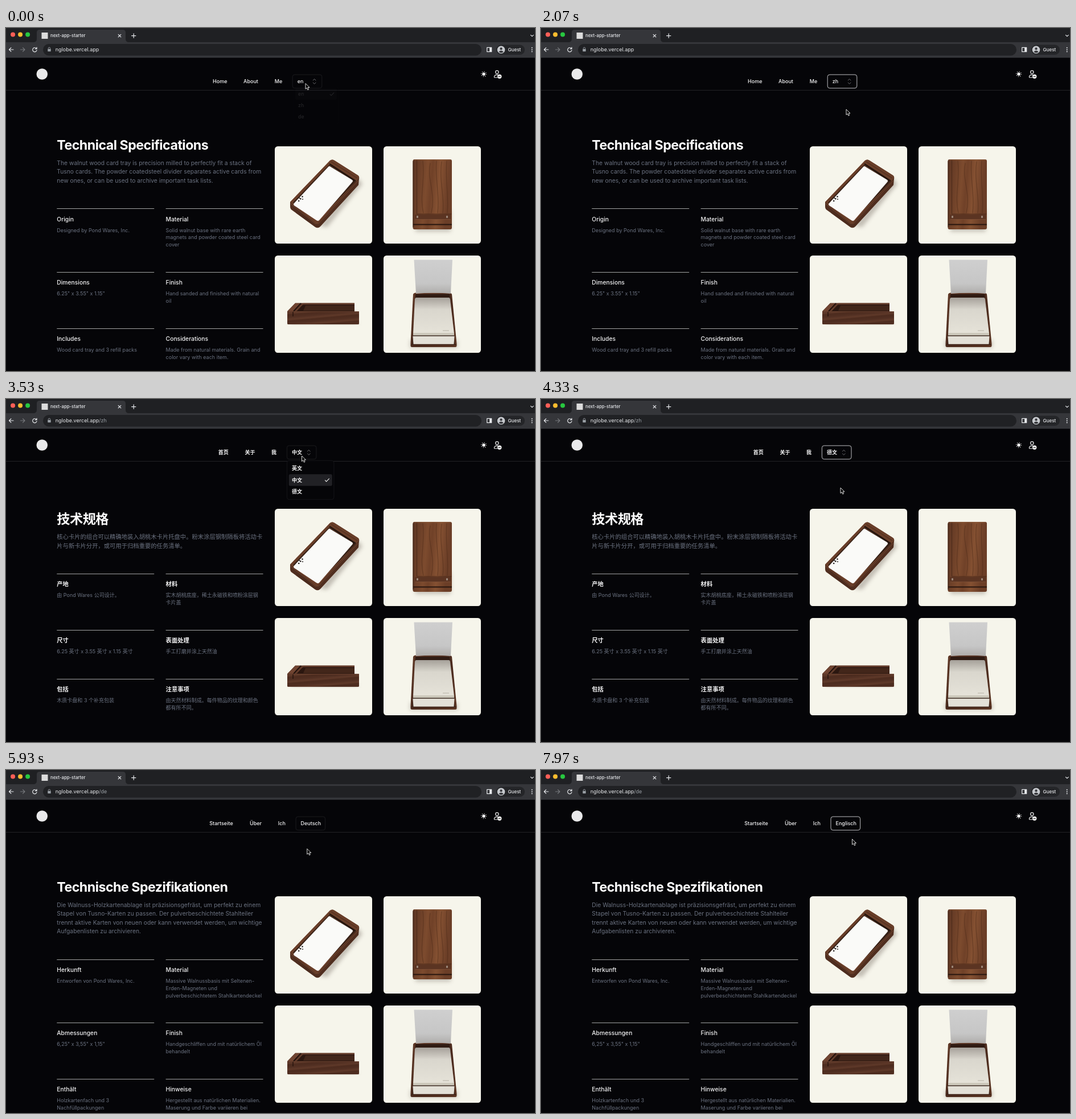
Animation, 929 px wide and 603 px high, one loop 8 s. Source, as an HTML page:

```html
<!DOCTYPE html>
<html lang="en">
<head>
<meta charset="utf-8">
<title>next-app-starter</title>
<style>
  html, body { margin: 0; width: 100%; height: 100%; overflow: hidden; background: #050508; }
  svg { display: block; width: 100vw; height: 100vh; }
  text { font-family: Inter, "Noto Sans CJK SC", "Noto Sans CJK", sans-serif; white-space: pre; }
  .line { fill: none; stroke-linecap: round; stroke-linejoin: round; }
</style>
</head>
<body>
<svg id="stage" viewBox="0 0 929 603" xmlns="http://www.w3.org/2000/svg">
  <defs>
    <linearGradient id="grain" gradientUnits="userSpaceOnUse" x1="52" y1="0" x2="120" y2="6">
      <stop offset="0" stop-color="#5a3322"/><stop offset=".2" stop-color="#6a3e27"/>
      <stop offset=".42" stop-color="#7d4b2e"/><stop offset=".55" stop-color="#704128"/>
      <stop offset=".75" stop-color="#855132"/><stop offset="1" stop-color="#6b3e27"/>
    </linearGradient>
    <linearGradient id="side" gradientUnits="userSpaceOnUse" x1="0" y1="0" x2="1" y2="11" spreadMethod="repeat">
      <stop offset="0" stop-color="#512f22"/><stop offset=".35" stop-color="#5f3929"/>
      <stop offset=".6" stop-color="#4c2b1e"/><stop offset="1" stop-color="#512f22"/>
    </linearGradient>
    <linearGradient id="rim" x1="0" y1="0" x2="1" y2="1">
      <stop offset="0" stop-color="#5f3826"/><stop offset=".55" stop-color="#4a2a1d"/><stop offset="1" stop-color="#5c3624"/>
    </linearGradient>
    <linearGradient id="paper" x1="0" y1="0" x2="0" y2="1">
      <stop offset="0" stop-color="#cfcfcf"/><stop offset=".7" stop-color="#c6c6c6"/><stop offset="1" stop-color="#aeacaa"/>
    </linearGradient>
    <linearGradient id="stack" x1="0" y1="0" x2="0" y2="1">
      <stop offset="0" stop-color="#a5a099"/><stop offset=".32" stop-color="#d9d6cd"/><stop offset="1" stop-color="#e6e3d9"/>
    </linearGradient>
    <filter id="soft" x="-30%" y="-30%" width="160%" height="160%"><feGaussianBlur stdDeviation="3.500"/></filter>
    <clipPath id="round"><rect width="171" height="171" rx="5.200"/></clipPath>

    <g id="photo0">
      <path d="M78 140L146 56L154 66L92 142Z" fill="#8d857b" opacity=".5" filter="url(#soft)"/>
      <path d="M97 25Q101 22 105 25L146 51Q149 53 148 57L147 68L80 141Q76 145 71 142L30 112Q27 110 27 106L27 98Z" fill="url(#rim)"/>
      <path d="M27 98L97 25Q101 22 105 25L146 51Q149 53 147 57L77 134Q74 137 70 134Z" fill="#693e29"/>
      <path d="M32 99L95 33L142 62L75 131Z" fill="#352016"/>
      <path d="M96 31L142 61" stroke="#21130d" stroke-width="2.400"/>
      <path d="M99 27L145 56" stroke="#4a2a1b" stroke-width="1"/>
      <path d="M94 36Q96 34 98 36L136 59Q138 61 136 63L78 130Q76 132 73 130L34 104Q32 102 34 100Z" fill="#fafaf8"/>
      <path d="M28 101L71 136L77 136L147 60" class="line" stroke="#764a33" stroke-width=".9"/>
      <g fill="#24201f"><circle cx="48.500" cy="88.500" r="1.300"/><circle cx="45.300" cy="92.300" r="1.300"/><circle cx="42.200" cy="96" r="1.300"/>
      <circle cx="49" cy="93" r="1"/><circle cx="43.300" cy="91" r="1"/></g>
    </g>
    <g id="photo1">
      <rect x="56" y="112" width="62" height="38" fill="#8d857b" opacity=".45" filter="url(#soft)"/>
      <rect x="51.500" y="23" width="68.500" height="123" rx="3" fill="url(#grain)"/>
      <path d="M52.500 26V142" stroke="#4d2c1c" stroke-width="2"/>
      <path d="M58.500 24V119H119" class="line" stroke="#4a2919" stroke-width="1"/>
      <path d="M54 24H118" stroke="#8d5d3e" stroke-width=".8"/>
      <path d="M82 30C76 60 92 80 84 117M102 27C97 60 108 92 104 117M69 26C73 60 63 88 70 117M93 26C90 55 99 84 95 117M111 26C108 60 115 90 112 117" class="line" stroke="#4a2818" stroke-width="1.300" opacity=".45"/>
      <rect x="55" y="120" width="63" height="8" fill="#5b3422"/>
      <path d="M56 128.500H118" stroke="#7d5036" stroke-width=".8"/>
      <path d="M52 137.500H120" stroke="#28160f" stroke-width="1.800"/>
      <g fill="#9b8779"><rect x="58" y="122" width="3" height="4" rx="1"/><rect x="110" y="122" width="3" height="4" rx="1"/></g>
    </g>
    <g id="photo2">
      <rect x="28" y="116" width="118" height="5" fill="#8d857b" opacity=".4" filter="url(#soft)"/>
      <path d="M22 98L36 83.500H140V99H148V119Q148 121 146 121H24Q22 121 22 119Z" fill="#5a3526"/>
      <path d="M47 86.500H140V98H37Z" fill="#2b1710"/>
      <path d="M54 88H140V97H50Z" fill="#42261a"/>
      <path d="M23 97.500L36.500 84H44L32 97.500Z" fill="#704431"/>
      <path d="M33 98L46 84" stroke="#1b0e0a" stroke-width="1.800"/>
      <path d="M38 97L50 84.500H139" class="line" stroke="#6b422f" stroke-width="1.500"/>
      <path d="M22 98.500H148V119Q148 121 146 121H24Q22 121 22 119Z" fill="url(#side)"/>
      <path d="M23 98.700H148" stroke="#6f4633" stroke-width=".9"/>
      <path d="M32 99V107" stroke="#21110c" stroke-width="1.300"/>
    </g>
    <g id="photo3">
      <path d="M47 148H130V162H46Z" fill="#8d857b" opacity=".4" filter="url(#soft)"/>
      <path d="M52 68Q53 65.500 56 65.500H116Q119 65.500 120 68L128.500 155V159Q128.500 161 126 161H50Q47.500 161 47.500 159V155Z" fill="url(#rim)"/>
      <path d="M56 68H116L125 156H51Z" fill="#2f1b13"/>
      <path d="M53.500 7.500H121L118 67Q86 64 57 67Z" fill="url(#paper)"/>
      <path d="M57.500 74H114.500Q116.500 74 117 77L124 137Q124 139 122 139H54Q52 139 52 137L55 77Q55.500 74 57.500 74Z" fill="url(#stack)"/>
      <path d="M52 136H124V140.500H52Z" fill="#cbc7ba"/>
      <path d="M51.500 142H124.500L123.500 156H52.500Z" fill="#e3e0d7"/>
      <path d="M52 141.300H124.500" stroke="#55463c" stroke-width="1.200"/>
      <path d="M48 156.500H128" stroke="#3c2117" stroke-width="1.500"/>
      <path d="M104 132H115" stroke="#a9a499" stroke-width=".8"/>
    </g>
  </defs>

  <rect width="929" height="603" fill="#050508"/>
  <g id="pages"></g>
  <rect y="109.200" width="929" height=".8" fill="#28282c"/>

  <rect width="929" height="26" fill="#1f2023"/>
  <path d="M48 25Q54 25 54 19V8Q54 3 59 3H205Q210 3 210 8V19Q210 25 216 25Z" fill="#35363a"/>
  <rect y="25" width="929" height="27.300" fill="#35363a"/>
  <rect x="65" y="28" width="770" height="20.500" rx="10.200" fill="#202124"/>
  <circle cx="12.100" cy="11.500" r="4" fill="#ff5f57"/>
  <circle cx="25.100" cy="11.500" r="4" fill="#febc2e"/>
  <circle cx="38.100" cy="11.500" r="4" fill="#28c840"/>
  <rect x="62.500" y="8" width="11" height="11" fill="#dcdcdc"/>
  <g class="line" stroke="#e8eaed" stroke-width="1.200">
    <path d="M197.200 11.300l4.600 4.600m0-4.600l-4.600 4.600M220.500 13.600h7.400m-3.700-3.700v7.400M921.500 12.300l2.400 2.400 2.400-2.400"/>
    <path d="M13 38H5.500m3.400-3.400L5.500 38l3.400 3.400"/>
    <path d="M25.500 38H33m-3.400-3.400L33 38l-3.400 3.400" stroke="#77797d"/>
    <path d="M53.400 36A3.700 3.700 0 1 0 54 39.200M54 34v2.700h-2.700"/>
    <path d="M74.300 37v-1.300a1.700 1.700 0 0 1 3.400 0V37" stroke="#9aa0a6" stroke-width=".9"/>
    <rect x="844.700" y="34.300" width="8" height="7.400"/>
  </g>
  <rect x="73.300" y="37" width="5.400" height="4.300" rx=".6" fill="#9aa0a6"/>
  <rect x="849.200" y="34.300" width="3.500" height="7.400" fill="#e8eaed"/>
  <rect x="861" y="29.500" width="50" height="17.500" rx="8.700" fill="#242528"/>
  <circle cx="869.500" cy="38.200" r="6.800" fill="#c6c9cd"/>
  <circle cx="869.500" cy="36.400" r="2.100" fill="#35363a"/>
  <path d="M865.300 42q4.200-4.400 8.400 0q-4.200 3.600-8.400 0Z" fill="#35363a"/>
  <g fill="#e8eaed"><circle cx="923.700" cy="34.800" r="1"/><circle cx="923.700" cy="38.200" r="1"/><circle cx="923.700" cy="41.600" r="1"/></g>
  <g id="labels"></g>

  <circle cx="63.300" cy="81" r="9.800" fill="#e9e9ea"/>
  <circle cx="839" cy="81" r="2.700" fill="#fff"/>
  <circle cx="839" cy="81" r="4.400" fill="none" stroke="#fff" stroke-width="1.300" stroke-dasharray="1 2.455"/>
  <g class="line" stroke="#eee" stroke-width="1.200">
    <circle cx="862.300" cy="77.600" r="2.700"/>
    <path d="M863 87H857.500Q856.700 82.400 862 82.400H864"/>
  </g>
  <circle cx="866.700" cy="85.300" r="3.700" fill="#eee"/>
  <path d="M864.700 85.300h4" stroke="#111" stroke-width="1"/>

  <g id="trigger"></g>
  <g id="menu"></g>
  <path id="cursor" d="M0 0V9.700L2.200 7.700L3.800 11.200L5.500 10.500L4 7H7Z" fill="#000" stroke="#fff" stroke-width=".85" stroke-linejoin="round"/>
</svg>

<script>
const LOOP = 8000;
const COL = [89.3, 280.6], PHOTO_X = [472, 663], CELL = 171, GAP = 20.6;
const SMALL = 9.03, BODY = 10.32, HEAD = 23.22;
const ITEM_H = 20.64, MENU_Y = 108.3, FIRST_ITEM = 121.6;

const pages = [
  {
    path: '', head: 206, intro: 237, rows: 317.3, photos: 208, trigger: 503.2, chevrons: true, medium: 500,
    nav: [[363, 'Home'], [417, 'About'], [471.7, 'Me']],
    langs: ['en', 'zh', 'de'],
    title: 'Technical Specifications',
    text: ['The walnut wood card tray is precision milled to perfectly fit a stack of',
      'Tusno cards. The powder coatedsteel divider separates active cards from',
      'new ones, or can be used to archive important task lists.'],
    specs: [['Origin', 'Designed by Pond Wares, Inc.'],
      ['Material', 'Solid walnut base with rare earth', 'magnets and powder coated steel card', 'cover'],
      ['Dimensions', '6.25" x 3.55" x 1.15"'],
      ['Finish', 'Hand sanded and finished with natural', 'oil'],
      ['Includes', 'Wood card tray and 3 refill packs'],
      ['Considerations', 'Made from natural materials. Grain and', 'color vary with each item.']]
  },
  {
    path: '/zh', head: 210.5, intro: 242.3, rows: 307.2, photos: 193, trigger: 493.4, chevrons: true, medium: 700,
    nav: [[372.8, '首页'], [419.4, '关于'], [466, '我']],
    langs: ['英文', '中文', '德文'],
    title: '技术规格',
    text: ['核心卡片的组合可以精确地装入胡桃木卡片托盘中。粉末涂层钢制隔板将活动卡',
      '片与新卡片分开，或可用于归档重要的任务清单。'],
    specs: [['产地', '由 Pond Wares 公司设计。'],
      ['材料', '实木胡桃底座，稀土永磁铁和喷粉涂层钢', '卡片盖'],
      ['尺寸', '6.25 英寸 x 3.55 英寸 x 1.15 英寸'],
      ['表面处理', '手工打磨并涂上天然油'],
      ['包括', '木质卡盘和 3 个补充包装'],
      ['注意事项', '由天然材料制成。每件物品的纹理和颜色', '都有所不同。']]
  },
  {
    path: '/de', head: 206, intro: 237, rows: 332.5, photos: 222.4, trigger: 509, chevrons: false, medium: 500,
    nav: [[357.3, 'Startseite'], [428, 'Über'], [477.8, 'Ich']],
    langs: ['Englisch', 'Chinesisch', 'Deutsch'],
    title: 'Technische Spezifikationen',
    text: ['Die Walnuss-Holzkartenablage ist präzisionsgefräst, um perfekt zu einem',
      'Stapel von Tusno-Karten zu passen. Der pulverbeschichtete Stahlteiler',
      'trennt aktive Karten von neuen oder kann verwendet werden, um wichtige',
      'Aufgabenlisten zu archivieren.'],
    specs: [['Herkunft', 'Entworfen von Pond Wares, Inc.'],
      ['Material', 'Massive Walnussbasis mit Seltenen-', 'Erden-Magneten und', 'pulverbeschichtetem Stahlkartendeckel'],
      ['Abmessungen', '6,25" x 3,55" x 1,15"'],
      ['Finish', 'Handgeschliffen und mit natürlichem Öl', 'behandelt'],
      ['Enthält', 'Holzkartenfach und 3', 'Nachfüllpackungen'],
      ['Hinweise', 'Hergestellt aus natürlichen Materialien.', 'Maserung und Farbe variieren bei', 'jedem Stück.']]
  }
];

// Each visit: page from start; menu open and close; choice picked at close.
const visits = [
  { start: 0, open: -18, close: 880, from: 0, to: 1 },
  { start: 2600, open: 3290, close: 4120, from: 1, to: 2 },
  { start: 4760, open: 6480, close: 7440, from: 2, to: 0 }
];

// time, x, y of the pointer tip
const pointer = [
  [0, 526, 97.5], [220, 527, 99], [740, 536, 141], [1170, 537, 148], [2070, 536, 143],
  [2650, 534, 140], [3150, 519, 97], [3530, 519.5, 100], [3960, 525, 158], [4350, 526, 156],
  [4970, 526.5, 143], [5850, 528, 141], [6400, 541, 98], [6830, 543, 105], [7300, 546, 121.5], [8000, 546.5, 121.5]
];

const $ = id => document.getElementById(id);
const clamp = v => Math.min(1, Math.max(0, v));
const ease = p => p * p * (3 - 2 * p);

// y is the middle of the line box
function label(x, y, str, size = SMALL, weight = 400, fill = '#f4f4f5', spacing = 0) {
  return `<text x="${x}" y="${y + size * .364}" font-size="${size}" font-weight="${weight}" fill="${fill}" letter-spacing="${spacing}">${str}</text>`;
}

function pageMarkup(page) {
  let out = page.nav.map(([x, s]) => label(x, 93.7, s, SMALL, page.medium)).join('');
  out += label(COL[0], page.head, page.title, HEAD, 700, '#fff', -HEAD * .023);
  page.text.forEach((s, i) => out += label(COL[0], page.intro + i * 15.48, s, BODY, 400, '#6b7280'));
  let y = page.rows;
  for (let i = 0; i < 6; i += 2) {
    const pair = page.specs.slice(i, i + 2);
    pair.forEach(([name, ...lines], c) => {
      out += `<rect x="${COL[c]}" y="${Math.round(y)}" width="170.900" height="1" fill="#a3a4a3"/>`;
      out += label(COL[c], y + 18.5, name, BODY, page.medium);
      lines.forEach((s, n) => out += label(COL[c], y + 38 + n * 12.9, s, SMALL, 400, '#6b7280'));
    });
    y += 72.9 + 12.9 * (Math.max(...pair.map(p => p.length)) - 1);
  }
  for (let i = 0; i < 4; i++) {
    const py = Math.round(page.photos + (i >> 1) * (CELL + GAP));
    out += `<g transform="translate(${PHOTO_X[i % 2]} ${py})" clip-path="url(#round)"><rect width="171" height="171" fill="#f6f5eb"/><use href="#photo${i}"/></g>`;
  }
  return `<g>${out}</g>`;
}

function triggerMarkup(page, value, ring) {
  const x = page.trigger;
  return `<rect x="${x}" y="82" width="51.600" height="23.800" rx="3.800" fill="none" stroke="${ring ? '#d4d4d8' : '#1d1d21'}" stroke-width=".9"/>`
    + label(x + 8.5, 93.7, page.langs[value], SMALL, page.medium)
    + (page.chevrons ? `<path class="line" d="M${x + 36} 92l2.400-2.300 2.400 2.300m-4.800 4l2.400 2.300 2.400-2.300" stroke="#88888c" stroke-width=".8"/>` : '');
}

function menuMarkup(page, chosen, active) {
  const x = page.trigger;
  const mid = i => FIRST_ITEM + i * ITEM_H;
  return `<rect x="${x}" y="${MENU_Y}" width="82.500" height="68.400" rx="3.900" fill="#050508" stroke="#1a1a1e" stroke-width=".8"/>`
    + `<rect x="${x + 3.3}" y="${mid(active) - ITEM_H / 2 + .3}" width="76" height="${ITEM_H}" rx="2.500" fill="#212125"/>`
    + page.langs.map((s, i) => label(x + 8.5, mid(i), s, SMALL, page.medium)).join('')
    + `<path class="line" d="M${x + 67} ${mid(chosen) + .6}l2.200 2.300 4.800-5" stroke="#eee" stroke-width="1.100"/>`;
}

function pointerAt(t) {
  const i = Math.max(1, pointer.findIndex(k => k[0] > t));
  const [a, b] = [pointer[i - 1], pointer[i]];
  const p = ease(clamp((t - a[0]) / (b[0] - a[0])));
  return [1, 2].map(n => a[n] + (b[n] - a[n]) * p);
}

$('pages').innerHTML = pages.map(pageMarkup).join('');
$('labels').innerHTML = label(78, 13.5, 'next-app-starter', 7.74, 500, '#e8eaed')
  + label(881.5, 38.2, 'Guest', 8.1, 500, '#e8eaed')
  + label(86.8, 38.2, 'nglobe.vercel.app<tspan id="path" fill="#9aa0a6"></tspan>', SMALL, 400, '#e8eaed');

function render(t) {
  const index = visits.findLastIndex(v => t >= v.start);
  const visit = visits[index], page = pages[index];
  [...$('pages').children].forEach((g, i) => g.style.display = i === index ? '' : 'none');
  $('path').textContent = page.path;

  const picked = t >= visit.close;
  $('trigger').innerHTML = triggerMarkup(page, picked ? visit.to : visit.from, picked);

  const [x, y] = pointerAt(t);
  $('cursor').setAttribute('transform', `translate(${x} ${y})`);

  const shown = picked ? 1 - clamp((t - visit.close) / 150) : clamp((t - visit.open) / 150);
  const menu = $('menu');
  menu.style.display = shown > 0 ? '' : 'none';
  if (shown > 0) {
    const hovered = Math.floor((y - FIRST_ITEM) / ITEM_H + .5);
    const active = picked ? visit.to : hovered >= 0 && y > 111.5 ? Math.min(2, hovered) : visit.from;
    menu.innerHTML = menuMarkup(page, picked ? visit.to : visit.from, active);
    const cx = page.trigger + 41.25, cy = 142.5;
    const lift = picked ? 0 : -7.5 * (1 - shown);
    menu.setAttribute('opacity', shown);
    menu.setAttribute('transform', `translate(${cx} ${cy + lift}) scale(${.95 + .05 * shown}) translate(${-cx} ${-cy})`);
  }
}

const began = performance.now();
function tick() {
  render((performance.now() - began) % LOOP);
  requestAnimationFrame(tick);
}
tick();
</script>
</body>
</html>
```
